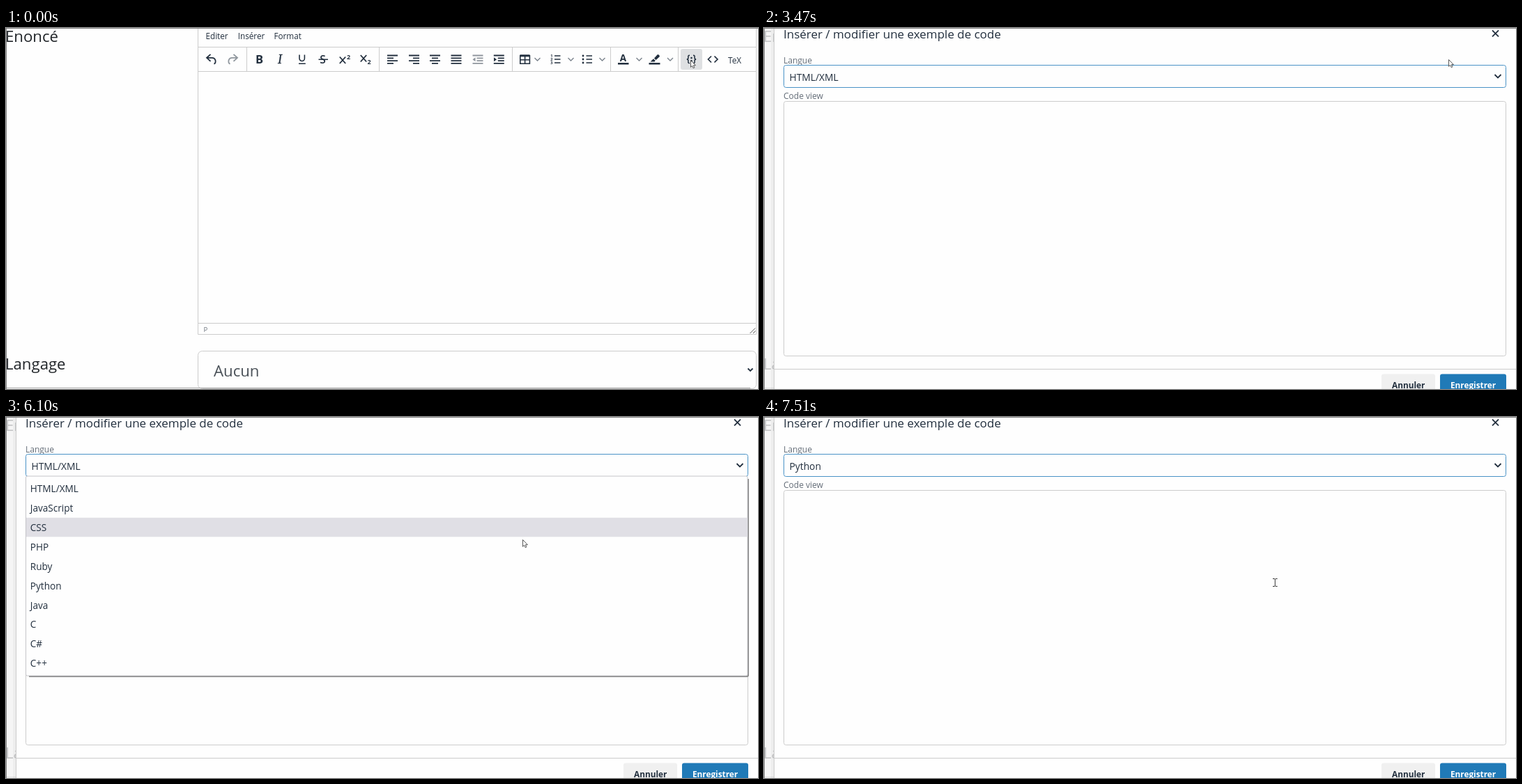
An HTML page for the animation above (8000 ms loop, 1079 px wide and 519 px high).

```html
<!DOCTYPE html>
<html lang="fr">
<head>
<meta charset="utf-8">
<title>Éditeur</title>
<style>
  html, body { margin: 0; width: 100%; height: 100%; overflow: hidden; background: #fefefe; }
  svg { display: block; width: 1079px; height: 519px; font-family: "Open Sans", "Noto Sans", sans-serif; }
  text { fill: #222f3e; white-space: pre; }
  .line { fill: none; stroke: #ccc; }
  .ico { fill: none; stroke: #222f3e; stroke-width: 1.8; }
  .chev { fill: none; stroke: #7c848d; stroke-width: 1.4; }
  .solid { fill: #222f3e; }
  .b { font-weight: 700; }
  .head { font-size: 22.2px; fill: #212529; }
  .menu { font-size: 11.7px; }
  .label { font-size: 12px; fill: #646d78; }
  .btn { font-size: 11.8px; font-weight: 700; }
</style>
</head>
<body>
<svg viewBox="0 0 1079 519">
  <rect width="1079" height="519" fill="#fefefe"/>

  <text class="head" x="-1" y="20">Enoncé</text>
  <text class="head" x="-1" y="491">Langage</text>

  <path class="line" d="M275.5 0V440.5H1076.5V0M276 27.5h800M276 62.5h800M276 424.5h800M345.5 28v34M535.5 28v34M726.5 28v34M867.5 28v34M964.5 28v34"/>
  <g class="menu">
    <text x="286.5" y="16">Editer</text>
    <text x="332.8" y="16">Insérer</text>
    <text x="384.5" y="16">Format</text>
    <text x="1036" y="50.5">TeX</text>
  </g>
  <text x="283.5" y="437" font-size="9.5" style="fill:#6a727b">P</text>
  <path d="M1067.5 439l7.5-7.5M1072 439l3.5-3.5" stroke="#555" fill="none"/>
  <rect class="line" x="275.5" y="464.5" width="801" height="54" rx="6"/>
  <text class="head" x="298" y="500.5" style="fill:#495057">Aucun</text>
  <path class="ico" d="M1064.5 489.5l3.5 3.5 3.5-3.5" stroke-width="1.5"/>
  <path d="M0 517.5H1068" stroke="#a5a5a5"/>

  <rect id="hover" x="968" y="30" width="31" height="30" rx="3" fill="#dee0e2"/>

  <g class="ico">
    <path id="undo" d="M293.5 37.8L288 42.8l5.5 5M288.5 42.8h7c5.6 0 6.6 7 3 9"/>
    <use href="#undo" transform="translate(620 0)scale(-1 1)" opacity=".5"/>
    <path d="M421 38.5v5.3a3.7 3.7 0 0 0 7.4 0v-5.3M420 51.2h9.8M448.5 45.2h13.5" stroke-width="1.6"/>
    <path d="M478.8 41.5l8.4 9.5M487.2 41.5l-8.4 9.5M508.8 39l8.4 9.5M517.2 39l-8.4 9.5"/>
    <g id="aligns"></g>
    <path d="M737.5 39.8h14" stroke-width="3"/>
    <path d="M737.8 39v12.2h13.6V39M738 45.8h13.4M744.6 40v11" stroke-width="1.6"/>
    <path d="M787 40h8.5M787 45h8.5M787 50h8.5M832.5 40h8.5M832.5 45h8.5M832.5 50h8.5" stroke-width="1.7"/>
    <path d="M878 51.3h15.5M922.5 51.3h16" stroke-width="2.4"/>
    <path d="M981 39.3c-3 0-2 1.8-2 3.3s-.7 2.4-2.2 2.4c1.5 0 2.2 1 2.2 2.4s-1 3.3 2 3.3M986 39.3c3 0 2 1.8 2 3.3s.7 2.4 2.2 2.4c-1.5 0-2.2 1-2.2 2.4s1 3.3-2 3.3" stroke-width="1.5"/>
    <path d="M1012 40.5l-4.5 4.5 4.5 4.5M1016.5 40.5l4.5 4.5-4.5 4.5" stroke-width="1.7"/>
  </g>
  <g class="solid">
    <path d="M930 43.5l4.5-5q1-.8 2 0l1 1q.8 1 0 2l-5 4.5zM929 44.3l2.8 2.8-1.3 1.4h-6z"/>
    <circle cx="983.5" cy="43" r="1.3"/><circle cx="983.5" cy="47.3" r="1.3"/>
    <circle cx="828" cy="40" r="1.4"/><circle cx="828" cy="45" r="1.4"/><circle cx="828" cy="50" r="1.4"/>
  </g>
  <g class="b">
    <text x="358" y="51" font-size="16.5">B</text>
    <text x="450.3" y="50.5" font-size="15.5" font-weight="600">S</text>
    <text x="489" y="44.5" font-size="9">2</text>
    <text x="518.5" y="51.5" font-size="9">2</text>
    <text x="880.8" y="48.3" font-size="13.5">A</text>
    <text x="781.3" y="42.3" font-size="5.5">1</text>
    <text x="781.3" y="47.3" font-size="5.5">2</text>
    <text x="781.3" y="52.3" font-size="5.5">3</text>
  </g>
  <text x="390" y="51" font-size="18" font-style="italic" font-family="'Liberation Serif', serif" stroke="#222f3e" stroke-width=".3">I</text>
  <g id="chevrons" class="chev"></g>

  <g id="tip">
    <rect x="968.5" y="66.5" width="140" height="20" fill="#fff" stroke="#767676"/>
    <text x="973" y="81" font-size="11" style="fill:#222">Insérer / modifier une exemple</text>
  </g>

  <g id="dialog">
    <rect width="1079" height="519" fill="#f3f3f3" opacity=".78"/>
    <path d="M10 0h4v519h-4z" fill="#000" opacity=".03"/>
    <rect x="14.5" y="-20" width="1100" height="560" fill="#fefefe" stroke="#ccc"/>
    <text x="28" y="15" font-size="17">Insérer / modifier une exemple de code</text>
    <path class="ico" d="M1045 3.3l9 9M1054 3.3l-9 9"/>
    <text class="label" x="28" y="51">Langue</text>
    <text class="label" x="28" y="102">Code view</text>
    <rect x="28.5" y="53.5" width="1036" height="32" rx="3" fill="#fefefe" stroke="#4a93c6"/>
    <text id="choice" x="36.5" y="75.5" font-size="13.8"></text>
    <path class="ico" d="M1048.5 67l4.5 4.5 4.5-4.5"/>
    <rect class="line" x="28.5" y="105.5" width="1036" height="366" rx="3"/>
    <path class="line" d="M15 490.5h1064"/>
    <rect x="886" y="497.5" width="77" height="40" rx="3" fill="#f0f0f0"/>
    <rect x="970" y="497.5" width="95" height="40" rx="3" fill="#207ab7"/>
    <text class="btn" x="901" y="517.5">Annuler</text>
    <text class="btn" x="985" y="517.5" style="fill:#fff">Enregistrer</text>
    <g id="list">
      <path d="M33 373H1063q2 0 2-2V89" fill="none" stroke="#8c8c8c" stroke-width="2"/>
      <rect x="28.5" y="85" width="1035.5" height="287" rx="2" fill="#fefefe" stroke="#c4c4c8"/>
      <rect id="mark" x="29" width="1035" height="27.6" fill="#e0dfe5"/>
      <g id="options" font-size="13.6"></g>
    </g>
  </g>

  <path d="M0 .5H1079M.5 0V519" stroke="#858585"/>

  <g id="pointer">
    <circle id="ring" cx=".5" cy=".5" r="6.7" fill="none" stroke="#555" stroke-width="1.1"/>
    <path id="arrow" d="M.5.5v9.8l2.2-2 1.5 3.4 1.7-.8-1.5-3.2h3z" fill="#fff" stroke="#444" stroke-width=".9"/>
    <path id="hand" d="M-1 7V1.2q1-1.5 2 0V5l4 .8q1.5.4 1.2 2l-.8 4.7h-5L-3.8 8.2q.6-1.6 1.8-.6z" fill="#fff" stroke="#333" stroke-width=".9"/>
    <path id="beam" d="M-3 -5.5h2.3l1 .7 1-.7h2.3M-3 5.5h2.3l1-.7 1 .7h2.3M.3-5V5" fill="none" stroke="#333"/>
  </g>
</svg>
<script>
  const $ = id => document.getElementById(id);
  const LOOP = 8000, ROW = 27.88;
  const names = ["HTML/XML", "JavaScript", "CSS", "PHP", "Ruby", "Python", "Java", "C", "C#", "C++"];

  $("options").innerHTML = names.map((n, i) =>
    `<text x="34.8" y="${108.3 + ROW * i}">${n}</text>`).join("");

  $("chevrons").innerHTML = [762.5, 810.5, 855.5, 908.5, 953].map(x =>
    `<path d="M${x - 4} 43l4 4 4-4"/>`).join("");

  // Paragraph icons: four bars, each [offset, width]
  const full = [0, 15];
  const bars = (x, rows) => rows.map(([dx, w], i) => `M${x + dx} ${39.5 + 3.8 * i}h${w}`).join("");
  const alternate = (x, short) => `<path d="${bars(x, [full, short, full, short])}"/>`;
  const indent = (x, arrow, opacity) => `<g opacity="${opacity}">
    <path d="${bars(x, [full, [6, 9], [6, 9], full])}"/>
    <path class="solid" stroke="none" d="${arrow}"/></g>`;
  $("aligns").innerHTML =
    alternate(547, [0, 9]) + alternate(578, [6, 9]) + alternate(608, [3, 9]) + alternate(638.5, full) +
    indent(669.5, "M669.5 45.2l4-3v6z", .5) + indent(699.8, "M704 45.2l-4-3v6z", 1);

  // [time, x, y, shape]
  const moves = [
    [0, 982, 46, "arrow"], [60, 982, 45, "arrow"], [4170, 948, 58, "arrow"],
    [4440, 938, 69, "hand"], [4500, 917, 79, "hand"], [4560, 894, 82, "hand"],
    [4620, 872, 77, "hand"], [4680, 857, 69, "hand"], [4740, 851, 65, "hand"],
    [5320, 851, 65, "arrow"], [5890, 834, 78, "arrow"], [5960, 786, 117, "arrow"],
    [6040, 759, 152, "arrow"], [6100, 741, 176, "arrow"], [6200, 736, 191, "arrow"],
    [6280, 734, 201, "arrow"], [6350, 733, 208, "arrow"], [6420, 733, 214, "arrow"],
    [6480, 733, 221, "arrow"], [6540, 733, 227, "arrow"], [6610, 733, 232, "arrow"],
    [6690, 733, 236, "arrow"], [6770, 733, 237, "arrow"], [7510, 733, 238, "beam"]
  ];
  // [time, highlighted row]
  const marks = [[0, 0], [6040, 1], [6100, 2], [6200, 3], [6350, 4], [6610, 5]];
  const clicks = [[2950, 3100], [5100, 5320], [7270, 7450]];

  const latest = (steps, t) => steps.filter(s => s[0] <= t).pop();
  const within = (t, [from, to]) => t >= from && t < to;
  const show = (id, on) => $(id).style.display = on ? "" : "none";

  function draw(t) {
    const [, x, y, shape] = latest(moves, t);
    $("pointer").setAttribute("transform", `translate(${x} ${y})`);
    for (const s of ["arrow", "hand", "beam"]) show(s, s === shape);
    show("ring", clicks.some(c => within(t, c)));

    show("tip", within(t, [740, 3010]));
    $("hover").setAttribute("fill", within(t, [3010, 3100]) ? "#c8cbcf" : "#dee0e2");

    show("dialog", t >= 3350);
    $("dialog").setAttribute("opacity", t < 3470 ? .5 : 1);
    show("list", within(t, [5230, 7450]));
    $("mark").setAttribute("y", 89 + ROW * latest(marks, t)[1]);
    $("choice").textContent = names[t < 7450 ? 0 : 5];
  }

  const start = performance.now();
  function tick() {
    draw((performance.now() - start) % LOOP);
    requestAnimationFrame(tick);
  }
  tick();
</script>
</body>
</html>
```
